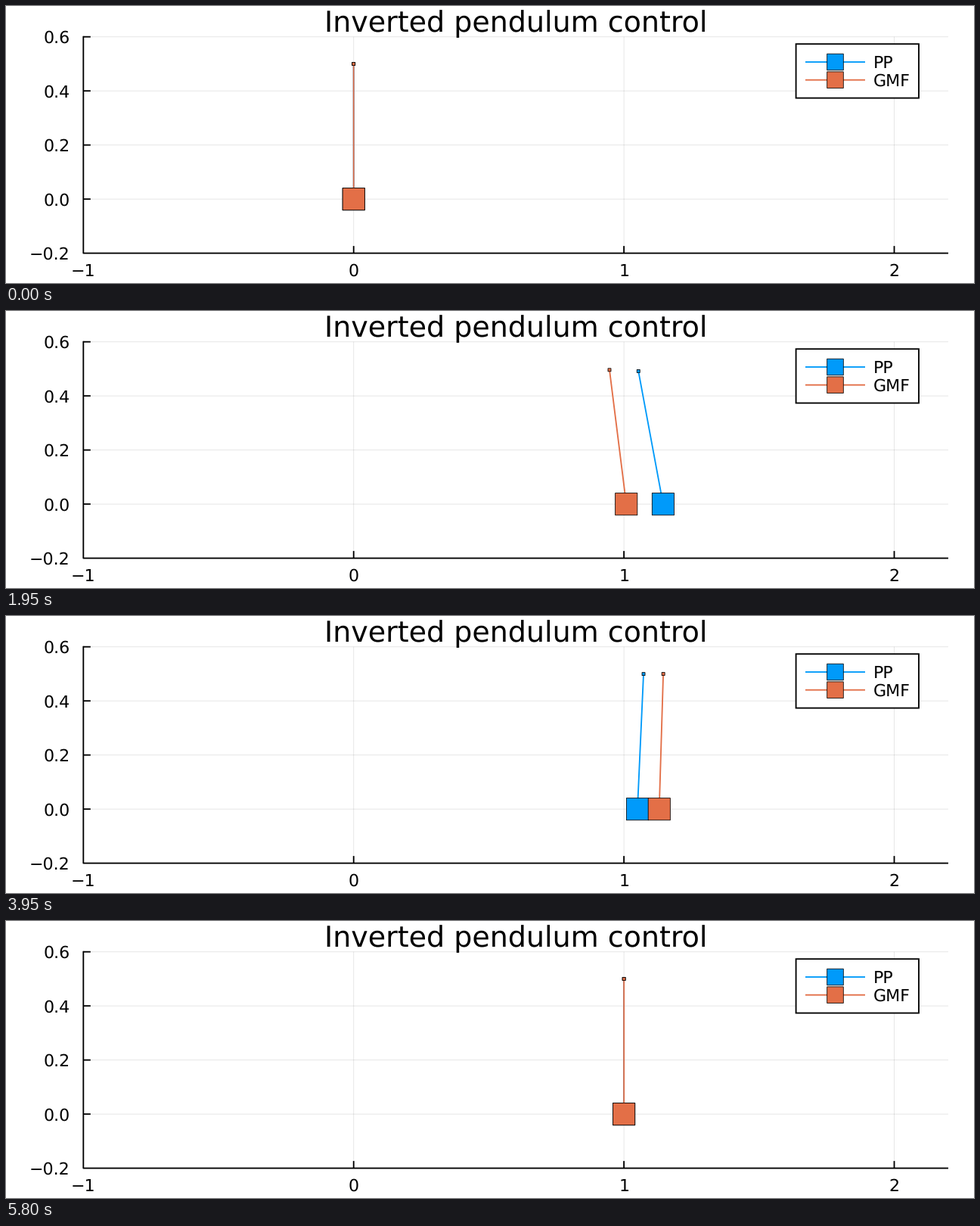
Recreate the animation shown at these times as a matplotlib script. Size 1280 by 366 pixels, loop 5.85 s.

```python
import matplotlib.pyplot as plt
import numpy as np
from matplotlib.animation import FuncAnimation
from matplotlib.patches import Rectangle

WIDTH, HEIGHT, DPI = 1280, 366, 100
PX = 72 / DPI  # points per pixel
FRAMES, INTERVAL = 117, 50
SIM_STEP = 0.03  # simulated seconds per frame
GRAVITY, ROD, GOAL = 9.81, 0.5, 1.0
BLUE, ORANGE = "#009AFA", "#E36F47"

LEFT, RIGHT, TOP, BOTTOM = 102.3, 1246.0, 40.7, 326.6
UNIT = (RIGHT - LEFT) / 3.2

plt.rcParams["font.family"] = "DejaVu Sans"
plt.rcParams["text.hinting"] = "none"

# Key poses: rise, overshoot and settling, shared by both controllers
KEY_TIMES = (1.2, 1.55, 2.4, 3.35, 3.95, 5.0)
PP_CART = (0.369, 0.721, 1.4835, 1.1675, 1.05, 1.005)
PP_BOB = (0.398, 0.711, 1.31, 1.1815, 1.0725, 1.01)
GMF_CART = (0.2546, 0.581, 1.389, 1.286, 1.1305, 1.0155)
GMF_BOB = (0.313, 0.6015, 1.2475, 1.268, 1.1455, 1.026)


def px(x):
    return LEFT + (x + 1) * UNIT


def py(y):
    return TOP + (0.6 - y) * UNIT


def trajectory(cart_keys, bob_keys, smoothness=0.1):
    """Smoothest balanced motion from rest, through the key poses, to GOAL."""
    bob = np.eye(FRAMES)
    accel = np.eye(FRAMES, k=1) - 2 * bob + np.eye(FRAMES, k=-1)
    accel[-1, -1] = -1
    # Linear pendulum: bob'' = (g / L) * (bob - cart)
    cart = bob - accel * ROD / (GRAVITY * SIM_STEP ** 2)
    at_rest = np.zeros((2, FRAMES))
    jerk = np.diff(np.vstack([at_rest, cart]), 3, axis=0) * smoothness
    keys = [0, *(round(t * 1000 / INTERVAL) for t in KEY_TIMES), FRAMES - 1]
    system = np.vstack([cart[keys], bob[keys], jerk])
    target = np.zeros(len(system))
    target[:2 * len(keys)] = [0, *cart_keys, GOAL, 0, *bob_keys, GOAL]
    path = np.linalg.lstsq(system, target, rcond=None)[0]
    return cart @ path, path


fig = plt.figure(figsize=(WIDTH / 100, HEIGHT / 100), dpi=DPI,
                 facecolor="white")
ax = fig.add_axes([0, 0, 1, 1])
ax.set(xlim=(0, WIDTH), ylim=(HEIGHT, 0))
ax.axis("off")


def line(xs, ys, color="black", width=1.85, z=2, **style):
    return ax.plot(xs, ys, color=color, lw=width * PX, zorder=z, snap=False,
                   solid_capstyle="butt", **style)[0]


def label(x, y, text, size=22.2, ha="center"):
    ax.text(x, y, text.replace("-", "\u2212"), fontsize=size * PX, ha=ha,
            va="baseline", zorder=5)


def square(x, y, size, color, z):
    patch = Rectangle((x - size / 2, y - size / 2), size, size, fc=color,
                      ec="black", lw=0.8 * PX, zorder=z, snap=False)
    return ax.add_patch(patch)


def draw_axes():
    label((LEFT + RIGHT) / 2, 33.8, "Inverted pendulum control", 38.0)
    for x in (-1, 0, 1, 2):
        label(px(x), 357, str(x))
        if x >= 0:
            line([px(x)] * 2, [TOP, BOTTOM], width=0.95, z=1, alpha=0.1)
            line([px(x)] * 2, [BOTTOM, BOTTOM - 9.5])
    for y in (-0.2, 0, 0.2, 0.4, 0.6):
        label(84.8, py(y) + 8.2, f"{y:.1f}", ha="right")
        if y >= 0:
            line([LEFT, RIGHT], [py(y)] * 2, width=0.95, z=1, alpha=0.1)
            line([LEFT, LEFT + 9.5], [py(y)] * 2)
    line([LEFT, LEFT, RIGHT], [TOP - 0.9, BOTTOM, BOTTOM])


def draw_legend():
    ax.add_patch(Rectangle((1044.6, 50.2), 162.4, 71.4, fc="white",
                           ec="black", lw=1.85 * PX, zorder=3, snap=False))
    for y, name, color in ((74, "PP", BLUE), (97.7, "GMF", ORANGE)):
        line([1057, 1136], [y, y], color, z=4)
        square(1096.5, y, 21.6, color, 4.5)
        label(1146.7, y + 8.2, name, ha="left")


class Pendulum:
    def __init__(self, color, z, cart_keys, bob_keys):
        self.cart_x, self.bob_x = trajectory(cart_keys, bob_keys)
        self.rod = line([], [], color, z=z)
        self.cart = square(0, 0, 29.2, color, z + 0.1)
        self.bob = square(0, 0, 4, color, z + 0.2)

    def pose(self, frame):
        cart, bob = self.cart_x[frame], self.bob_x[frame]
        height = np.sqrt(max(ROD ** 2 - (bob - cart) ** 2, 0))
        ends = [(px(cart), py(0)), (px(bob), py(height))]
        self.rod.set_data(*zip(*ends))
        for patch, (x, y) in zip((self.cart, self.bob), ends):
            half = patch.get_width() / 2
            patch.set_xy((x - half, y - half))
        return self.rod, self.cart, self.bob


draw_axes()
draw_legend()
pendulums = [Pendulum(BLUE, 2.2, PP_CART, PP_BOB),
             Pendulum(ORANGE, 2.6, GMF_CART, GMF_BOB)]


def update(frame):
    return [artist for p in pendulums for artist in p.pose(frame)]


animation = FuncAnimation(fig, update, frames=FRAMES, interval=INTERVAL,
                          init_func=lambda: update(0), repeat=True,
                          repeat_delay=0, blit=False)
plt.show()
```
